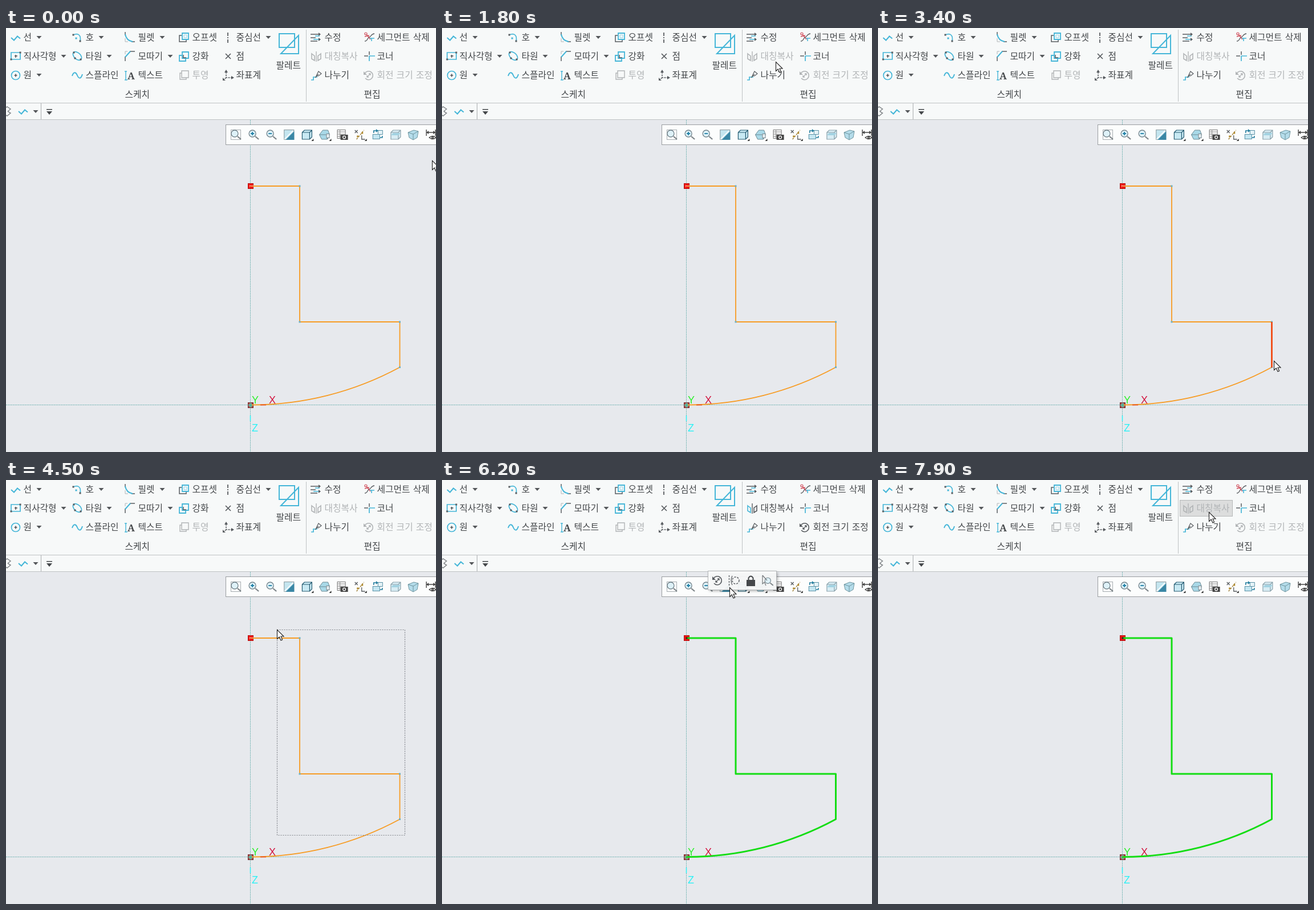
These frames come from a looping animation (754x743 px, 8000 ms). An HTML page with a canvas:

```html
<!DOCTYPE html>
<html lang="ko">
<head>
<meta charset="utf-8">
<style>
html, body { margin: 0; width: 100%; height: 100%; overflow: hidden; background: #e7e9ed; }
canvas { display: block; }
</style>
</head>
<body>
<canvas id="stage" width="754" height="743"></canvas>
<script>
const g = document.getElementById('stage').getContext('2d');
const LOOP = 8000, STEP = 100;
const BLUE = '#45b6d8', DARK = '#585c60', INK = '#45484b', OFF = '#b1b4b6', RED = '#cf4a58';
const FONT = '"Noto Sans CJK KR", "Noto Sans CJK", "Noto Sans", sans-serif';

function line(d, color = DARK, w = 1.5) {
  g.strokeStyle = color;
  g.lineWidth = w;
  g.stroke(new Path2D(d));
}
function fill(d, color = DARK) {
  g.fillStyle = color;
  g.fill(new Path2D(d));
}
function box(x, y, w, h, color, edge) {
  if (color) { g.fillStyle = color; g.fillRect(x, y, w, h); }
  if (edge) { g.strokeStyle = edge; g.lineWidth = 1; g.strokeRect(x + .5, y + .5, w - 1, h - 1); }
}
function ring(x, y, r, color, w = 1.5, inside) {
  g.beginPath();
  g.arc(x, y, r, 0, 7);
  if (inside) { g.fillStyle = inside; g.fill(); }
  g.strokeStyle = color;
  g.lineWidth = w;
  g.stroke();
}
function dots(color, size, ...pts) {
  for (const [x, y] of pts) box(x - size / 2, y - size / 2, size, size, color);
}
function label(s, x, cy, color = INK) {
  g.font = '350 15.8px ' + FONT;
  g.wordSpacing = '1.5px';
  g.fillStyle = color;
  g.fillText(s, x - .5, cy + 6);
}
function drop(x, y) {
  fill(`M${x - 4.5},${y - 2}h9l-4.5,5z`, '#55585b');
}
function at(x, y, draw) {
  g.save();
  g.translate(x, y);
  draw();
  g.restore();
}

// Ribbon icons, each drawn around its own centre
const zigzag = () => line('M-8,0l5,4.5l6,-7l5,4', BLUE, 2);
function arcIcon() {
  line('M-7,-4C2,-8 7,-3 5,7', BLUE, 1.7);
  dots(DARK, 3, [-7, -4], [5, 7]);
  dots(BLUE, 3, [-2, 2]);
}
function filletIcon() {
  line('M-8,-9V-3M3,8H9');
  line('M-8,-5Q-6,6 5,8', BLUE, 2);
  line('M-8,2V8H-3', OFF, 1);
}
function chamferIcon() {
  line('M-8,9V1M0,-8H9');
  line('M-8,2L1,-8', BLUE, 2);
  line('M-8,-3V-8H-4', OFF, 1);
}
function offsetIcon() {
  line('M-3,-7H8V4H-3z', BLUE, 1.8);
  line('M-4,-3H-8V8H4V5', DARK, 1.5);
  line('M0,-4H5V1H0z', '#93d2e6', 1);
}
function thickenIcon() {
  line('M-3,-8H8V3H-3z', BLUE, 1.8);
  line('M-4,-2H-8V8H3V4', BLUE, 1.8);
  line('M-1,-3V2H4', DARK, 1.5);
}
function rectIcon() {
  line('M-8,-6H8V6H-8z', BLUE, 1.7);
  line('M-2,0H3M0,-2V3', DARK, 1.6);
  dots(DARK, 3, [8, -6], [-8, 6]);
}
function ellipseIcon() {
  g.save();
  g.rotate(.75);
  g.beginPath();
  g.ellipse(0, 0, 9, 5.5, 0, 0, 7);
  g.strokeStyle = BLUE;
  g.lineWidth = 1.7;
  g.stroke();
  g.restore();
  dots(DARK, 3, [-6, -6], [6, 6], [-4, 4]);
}
function circleIcon() {
  ring(0, 0, 7.5, BLUE, 1.7);
  line('M-2.5,0H2.5M0,-2.5V2.5', DARK, 1.7);
}
const splineIcon = () => line('M-9,1C-6,-8 -2,-5 0,0S6,8 9,-2', BLUE, 2);
function textIcon() {
  line('M-7,-7V8M-9,-7H-5M-9,8H-4', BLUE, 1.4);
  g.font = 'bold 17px "Noto Serif", "Liberation Serif", serif';
  g.fillStyle = INK;
  g.fillText('A', -4, 7);
}
function projectIcon() {
  line('M-4,-7H8V5H-4z', OFF, 1.4);
  line('M-4,-3H-7V8H4V5', OFF, 1.4);
}
function axesIcon() {
  g.setLineDash([3, 1.5]);
  line('M-4,-6V4H7M-4,4L-9,8');
  g.setLineDash([]);
  fill('M-7,-5l3,-5l3,5zM5,1l5,3l-5,3zM-10,4v5h5z');
}
function paletteIcon() {
  line('M0,0H27V24H0z', BLUE, 2);
  line('M34,3V35H3z', BLUE, 2);
}
function modifyIcon() {
  line('M-9,-6H5M-9,0H0M-9,6H3', DARK, 1.3);
  line('M-1,-3H7M-4,3H7', BLUE, 1.6);
  fill('M5,-9l4,3l-4,3zM5,0l4,3l-4,3z', DARK);
}
function trimIcon() {
  line('M-8,7C-2,7 -4,1 0,0S3,-6 9,-6', DARK, 1.3);
  line('M-5,-5L2,4M-8,-1L0,-3', RED, 1.3);
  ring(-6, -6, 2, RED, 1.2);
  line('M1,2H9M4,7V2', BLUE, 1.6);
}
function mirrorIcon(on) {
  const c = on ? BLUE : OFF, d = on ? DARK : OFF;
  line('M-8,-5L-3,-1V7L-8,4z', c, 1.6);
  line('M8,-5L3,-1V7L8,4z', d, 1.6);
  line('M0,-9V9', d, 1.4);
}
function cornerIcon() {
  line('M0,0H10M0,0V9', BLUE, 1.7);
  line('M-9,0H-2M0,-8V-2', DARK, 1.5);
}
function divideIcon() {
  line('M-9,8H-5V3H2', BLUE, 1.7);
  line('M0,1L4,-7L9,-3L4,1z', DARK, 1.2);
  line('M-2,4L4,-2', DARK, 1.2);
}
function rotateIcon(on) {
  const c = on ? DARK : OFF;
  line('M-7,-3A7.5,7.5 0 1 1 -6,5', c, 1.6);
  line('M-3,3L3,-3M0,-3H3V0M-3,0V3H0', c, 1.3);
  fill('M-9,-7v6h6z', c);
}

// View toolbar icons
function lens(mark) {
  line('M3,3L9,8', '#7b8387', 2.2);
  ring(-2, -2, 6, '#71828a', 1.3, '#def1f8');
  line(mark, '#1d7fa6', 1.8);
}
function cube(face, edge) {
  fill('M-8,-4L-4,-8H9V4L5,8H-8z', face);
  line('M-8,-4L-4,-8H9V4L5,8H-8zM-8,-4H5V8M5,-4L9,-8', edge, 1.2);
}
const corner = () => fill('M12,7v4h-4z', '#333');
const views = [
  () => { box(-9, -9, 18, 18, '#fff', '#a5abaf'); lens(''); },
  () => lens('M-5,-2H1M-2,-5V1'),
  () => lens('M-5,-2H1'),
  () => {
    box(-9, -9, 18, 18, '#c4e5ef', '#8b989e');
    fill('M9,-6V9H-6z', '#3a87a5');
    line('M-8,8L7,-7', '#fff', 1.6);
  },
  () => { cube('#c8e9f3', '#245a70'); corner(); },
  () => {
    fill('M-9,0L-3,-8L6,-8L9,0L5,8H-5z', '#a9d9e8');
    line('M-9,0L-3,-8H6L9,0L5,8H-5zM-9,0H3L9,0M3,0L5,8', '#6c8993', 1);
    box(3, -2, 6, 8, '#e8f0f3', '#75868d');
    corner();
  },
  () => {
    box(-9, -9, 15, 16, '#fff', '#777');
    line('M-9,-5H6M-9,-1H6M-9,3H6M-4,-9V7', '#888', 1);
    box(-3, 0, 13, 9, '#444');
    ring(3.5, 4.5, 2.4, '#fff', 1.3);
  },
  () => {
    g.setLineDash([3, 2]);
    line('M-6,8L7,-8', '#9a7a30', 1.4);
    g.setLineDash([]);
    line('M-9,-8l5,5m0,-5l-5,5M3,1V8H9', DARK, 1.3);
    dots('#b18a2b', 3, [4, -3], [-4, 3]);
    corner();
  },
  () => {
    box(-9, -1, 13, 9, '#c5e7f2', '#5a91a5');
    box(0, -8, 9, 8, '#e6f4f8', '#5a91a5');
    line('M-7,-3V-7H-2M8,2V5H4', '#237d9e', 1.6);
    fill('M-3,-10l4,3l-4,3z', '#237d9e');
  },
  () => {
    cube('#d8edf4', '#8ba2ab');
    fill('M-8,1L-4,-3H9L5,1z', '#a3d3e2');
  },
  () => {
    fill('M-9,-4L1,-8L9,-6L7,5L0,9L-7,5z', '#b4dcea');
    line('M-9,-4L1,-8L9,-6L7,5L0,9L-7,5zM-9,-4L0,-1L9,-6M0,-1V9', '#6f959f', 1);
  },
  () => {
    line('M-8,-9V2M8,-9V2M-8,-4H8', '#444', 1.4);
    fill('M-8,-4l4,-3v6zM8,-4l-4,-3v6z', '#444');
    line('M-3,5Q3,0 9,5Q3,10 -3,5z', '#444', 1.3);
    ring(3, 5, 1.5, '#444');
  }
];

function ribbon(s) {
  box(0, 0, 754, 161, '#f7f9f9');
  box(0, 131, 754, 1, '#bfc2c4');
  box(0, 160, 754, 1, '#bfc2c4');
  box(526, 3, 1, 126, '#bfc2c4');
  box(61, 132, 1, 28, '#a9acae');

  if (s.pressed) box(529, 35, 93, 29, '#dcdddd', '#b6b8b9');
  else if (s.over) box(529, 35, 93, 29, '#d3f2f9', '#93d5e6');

  const can = s.picked && !s.pressed;
  const rows = [
    [['선', 31], ['호', 140], ['필렛', 232], ['오프셋', 327], ['중심선', 404], ['수정', 559], ['세그먼트 삭제', 651]],
    [['직사각형', 31], ['타원', 140], ['모따기', 232], ['강화', 327], ['점', 404], ['대칭복사', 559, !can], ['코너', 651]],
    [['원', 31], ['스플라인', 140], ['텍스트', 232], ['투영', 327, true], ['좌표계', 404], ['나누기', 559], ['회전 크기 조정', 651, !can]]
  ];
  rows.forEach((row, i) => row.forEach(([t, x, off]) => label(t, x, 16 + i * 33, off ? OFF : INK)));
  label('스케치', 209, 116);
  label('편집', 628, 116);
  label('팔레트', 474, 65);

  for (const [x, y] of [[58, 16], [167, 16], [274, 16], [460, 16], [101, 49], [181, 49], [288, 49], [58, 82], [52, 146]]) drop(x, y);
  box(71, 142, 10, 1.5, INK);
  fill('M71,146h10l-5,6z', INK);

  at(17, 17, zigzag);
  at(125, 16, arcIcon);
  at(217, 16, filletIcon);
  at(312, 16, offsetIcon);
  g.setLineDash([6, 2, 2, 2]);
  line('M389,8V26', DARK, 1.8);
  g.setLineDash([]);
  at(479, 10, paletteIcon);
  at(543, 17, modifyIcon);
  at(637, 16, trimIcon);
  at(17, 49, rectIcon);
  at(125, 49, ellipseIcon);
  at(217, 49, chamferIcon);
  at(312, 50, thickenIcon);
  line('M385,45l9,9m0,-9l-9,9', DARK, 1.7);
  at(544, 50, () => mirrorIcon(can));
  at(637, 49, cornerIcon);
  at(17, 83, circleIcon);
  at(125, 83, splineIcon);
  at(217, 83, textIcon);
  at(312, 82, projectIcon);
  at(390, 83, axesIcon);
  at(544, 83, divideIcon);
  at(636, 83, () => rotateIcon(can));
  at(30, 146, zigzag);
  line('M-4,142L2,138L8,142L3,146M-3,151L2,154L8,149L3,146', '#85898c', 1.5);
}

function viewBar() {
  box(385, 169, 380, 36, '#fcfdfd', '#9a9da0');
  views.forEach((draw, i) => at(403 + i * 31.1, 187, draw));
}

function miniBar() {
  g.save();
  g.shadowColor = 'rgba(0,0,0,.4)';
  g.shadowBlur = 5;
  g.shadowOffsetX = g.shadowOffsetY = 2;
  box(467, 160, 119, 32, 'rgba(252,253,253,.93)');
  g.restore();
  box(466, 159, 121, 34, null, '#b4b7b9');
  at(483, 176, () => rotateIcon(true));
  g.setLineDash([3, 2]);
  line('M503.5,167V186', DARK, 1.3);
  ring(515, 176, 6, DARK, 1.5);
  g.setLineDash([]);
  line('M509,168Q505,176 509,184', DARK, 1.2);
  box(534, 175, 15, 11, '#45484b');
  line('M537.5,176V171.5Q541.5,165.5 545.5,171.5V176', '#45484b', 2);
  at(573, 178, () => { g.scale(.85, .85); lens(''); });
  line('M562,167V182L565.5,179L568,185M562,167L570,176', '#74787b', 1.2);
}

const profile = 'M429,277H515V515H690.5V594.5A547.4,547.4 0 0 1 429,660.5';

function sketch(s) {
  g.setLineDash([2, 1]);
  line('M428.5,161V743M0,660.5H754', '#74b4b4', 1);
  g.setLineDash([]);
  box(424, 272, 10, 10, '#ee1212', '#b31212');
  box(424, 656, 10, 10, '#7f9a8e', '#6d3030');
  dots('#c23333', 2, [426, 658], [432, 658], [426, 664], [432, 664]);

  g.lineJoin = 'round';
  line(profile, s.picked ? '#14dd14' : '#f79c24', s.picked ? 3 : 1.8);
  g.lineJoin = 'miter';
  if (s.picked) {
    dots('#20301c', 3, [429, 277]);
    dots('#30c930', 3, [429, 661]);
  } else {
    dots('#6db2c6', 3, [515, 277], [515, 515], [690.5, 515], [690.5, 594.5]);
    line('M427.5,275V279M427,276.5H434', '#f5a58c', 1);
    dots('#53b59b', 4, [429, 661]);
    line('M446,660.5H456', '#e8541c', 1.8);
  }
  if (s.hot) line('M690.5,515V595', '#f0430f', 2.6);

  g.font = '18px "Liberation Sans", Arial, sans-serif';
  for (const [c, x, y, color] of [['Y', 431, 658, '#2bf12b'], ['X', 461, 658, '#d31640'], ['Z', 431, 707, '#2cf1f5']]) {
    g.fillStyle = color;
    g.fillText(c, x, y);
  }
  line('M428.5,679V689', '#2cf1f5', 1.5);
}

// Pointer stops: time, x, y
const stops = [
  [0, 747, 232], [200, 747, 232], [1500, 585, 59], [2200, 585, 59], [3300, 694, 583], [3400, 694, 583],
  [3700, 700, 623], [4500, 475, 262], [4700, 467, 253], [5700, 467, 253], [7000, 580, 56], [LOOP, 580, 56]
];
function pointer(t) {
  const i = stops.findIndex(s => s[0] > t);
  const [t0, x0, y0] = stops[i - 1], [t1, x1, y1] = stops[i];
  const u = (t - t0) / (t1 - t0), e = u * u * (3 - 2 * u);
  return [x0 + (x1 - x0) * e, y0 + (y1 - y0) * e].map(Math.round);
}

function render(t) {
  const [x, y] = pointer(t);
  const drag = t >= 3700 && t < 4700;
  const s = {
    picked: t >= 4700,
    pressed: t >= 7500,
    over: t >= 4700 && x >= 529 && x < 622 && y >= 35 && y < 64,
    hot: !drag && Math.abs(x - 690) < 8 && y > 515 && y < 600
  };
  box(0, 0, 754, 743, '#e7e9ed');
  sketch(s);
  ribbon(s);
  viewBar();
  if (t >= 4900 && !s.pressed) miniBar();
  if (drag) {
    g.setLineDash([2, 2]);
    line(`M${x + .5},${y + .5}H699.5V622.5H${x + .5}z`, '#80848a', 1.2);
    g.setLineDash([]);
  }
  at(x, y, () => {
    const arrow = 'M.5,.5V16.5L4.2,13L7,19L9.6,18L7,12H12z';
    fill(arrow, '#fff');
    line(arrow, '#1c1c1c', 1.1);
  });
}

let last = -1;
function tick(now) {
  const t = Math.floor(now % LOOP / STEP) * STEP;
  if (t !== last) render(last = t);
  requestAnimationFrame(tick);
}
render(0);
requestAnimationFrame(tick);
</script>
</body>
</html>
```
